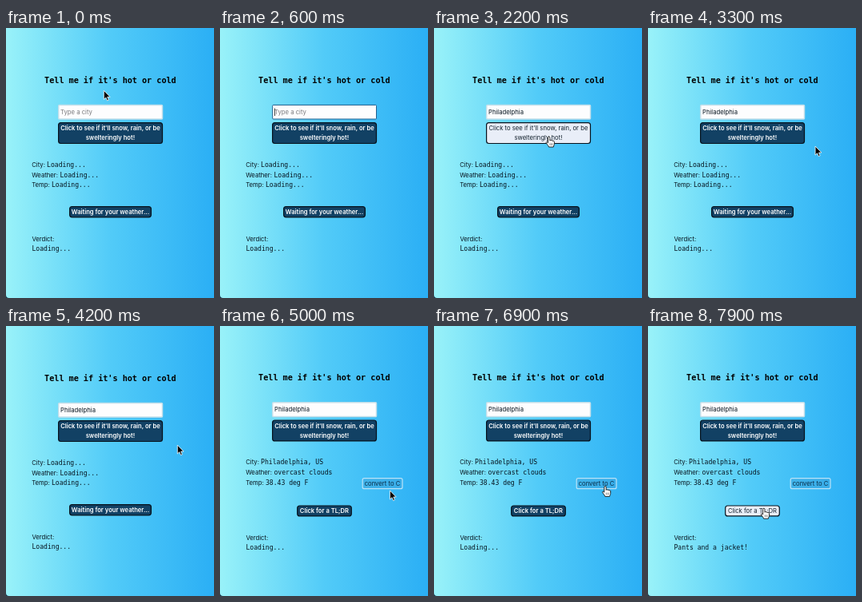
Write an HTML page that moves like this. It is 260x338 px and loops after 8000 ms.

```html
<!DOCTYPE html>
<html lang="en">
<head>
<meta charset="utf-8">
<title>Hot or cold</title>
<style>
  html, body { margin: 0; width: 100%; height: 100%; overflow: hidden; background: #12324a; }
  svg { display: block; width: 260px; height: 338px; }
  text { font: 7.7px Inter, sans-serif; fill: #06141f; white-space: pre; }
  .mono { font: 8.1px "DejaVu Sans Mono", monospace; }
  .title { font: bold 10.15px "DejaVu Sans Mono", monospace; fill: #000; }
  .center { text-anchor: middle; }
  .button rect { fill: #124164; stroke: #06121d; stroke-width: 1.2; }
  .button text { fill: #fff; font-size: 7.6px; font-weight: 600; text-anchor: middle; }
  .button.hover rect { fill: #e9eef8; }
  .button.hover text { fill: #14222e; font-size: 7.7px; font-weight: 400; }
  .field { fill: #fdfdfe; stroke: #c3dfea; stroke-width: 1.5; }
  .field.focus { stroke: #20608f; stroke-width: 1; }
  .placeholder { fill: #7b7b7e; }
</style>
</head>
<body>
<svg viewBox="0 0 260 338">
  <defs>
    <linearGradient id="sky">
      <stop offset="0" stop-color="#99f2f9"/>
      <stop offset=".5" stop-color="#52cbf8"/>
      <stop offset="1" stop-color="#2baff5"/>
    </linearGradient>
  </defs>
  <path fill="url(#sky)" d="M0 0H260V338H4Q0 338 0 334Z"/>

  <g id="form">
    <text class="title center" x="130.4" y="69">Tell me if it's hot or cold</text>

    <rect id="field" class="field" x="65.7" y="96.4" width="129.8" height="17.6" rx="1"/>
    <text id="typed" x="68" y="108"></text>
    <path id="caret" d="M0 100.5V110" stroke="#111" stroke-width=".8"/>

    <g id="submit" class="button">
      <rect x="65.6" y="118.6" width="129.9" height="25.9" rx="3"/>
      <text x="130.4" y="128.3">Click to see if it'll snow, rain, or be</text>
      <text x="130.4" y="140.3">swelteringly hot!</text>
    </g>

    <text x="32.2" y="174">City:</text><text id="city" class="mono" x="51.1" y="174"></text>
    <text x="32.2" y="186.7">Weather:</text><text id="weather" class="mono" x="67.4" y="186.7"></text>
  </g>
  <text x="32.2" y="199.4">Temp:</text><text id="temp" class="mono" x="56.9" y="199.4"></text>

  <g id="convert">
    <rect x="178.2" y="190.7" width="49.8" height="13" rx="2" fill="#3c9bd0" fill-opacity=".35" stroke="#b9e3f8" stroke-width="1.2"/>
    <text class="center" x="203" y="200" style="fill:#0b2f4a">convert to C</text>
  </g>

  <g id="waiting" class="button">
    <rect x="79.6" y="223.7" width="101.8" height="13.1" rx="3"/>
    <text x="130.5" y="233">Waiting for your weather...</text>
  </g>
  <g id="summary" class="button">
    <rect x="96.7" y="225" width="67.6" height="12.9" rx="3"/>
    <text x="130.4" y="234.3">Click for a TL;DR</text>
  </g>

  <g id="result">
    <text x="32.4" y="267">Verdict:</text>
    <text id="verdict" class="mono" x="32.4" y="279"></text>
  </g>

  <g id="cursor" stroke-linejoin="round">
    <path id="arrow" d="M0 0V11L2.5 8.7 4.2 12.6 6 11.8 4.4 8H7.8Z" fill="#000" stroke="#fff" stroke-width=".8"/>
    <g id="hand">
      <path d="M-1.2 1.3C-1.2 -.3 1.2 -.3 1.2 1.3V5C1.6 3.9 3.2 4.1 3.3 5.2 3.8 4.3 5 4.6 5.1 5.7 5.8 5 6.7 5.5 6.7 6.6V9.2C6.7 10.6 5.8 11.2 5.6 13H-.2C-.5 11.4 -2.4 9.8 -3.4 7.9 -3.8 6.7 -2.5 6.3 -1.2 7.8Z" fill="#fff" stroke="#111" stroke-width=".9"/>
      <path d="M1.2 8.2V11M2.8 8.2V11M4.4 8.2V11" stroke="#333" stroke-width=".5"/>
    </g>
  </g>
</svg>
<script>
const LOOP = 8000, STEP = 100;
const CITY = "Philadelphia", LOADING = "Loading...";
const TYPE_START = 650, TYPE_RATE = 100;
const RESULTS_AT = 4400, VERDICT_AT = 7800;

// Each move: start, end, destination of the pointer tip
const START = [122.3, 78.3];
const moves = [
  [100, 400, 117, 104],
  [1750, 2150, 143.7, 136],
  [2800, 3400, 214.3, 149],
  [4500, 4950, 212.4, 206],
  [5050, 5500, 214, 200.4],
  [6900, 7600, 144.8, 228.2]
];

const $ = id => document.getElementById(id);
const show = (id, on) => $(id).style.display = on ? "" : "none";
const write = (id, text) => $(id).textContent = text;
const place = (id, x, y) => $(id).setAttribute("transform", `translate(${x} ${y})`);
const ease = p => p * p * (3 - 2 * p);

function pointer(t) {
  let [x, y] = START;
  for (const [from, to, endX, endY] of moves) {
    const p = ease(Math.min(1, Math.max(0, (t - from) / (to - from))));
    x += (endX - x) * p;
    y += (endY - y) * p;
  }
  return [x, y];
}

function over(id, x, y) {
  const box = $(id).querySelector("rect").getBBox();
  return x >= box.x && x <= box.x + box.width && y >= box.y - 1 && y <= box.y + box.height;
}

function render(t) {
  const ready = t >= RESULTS_AT;
  const focused = t >= 500 && t < 2100;
  const count = t < TYPE_START ? 0 : Math.floor((t - TYPE_START) / TYPE_RATE) + 1;
  const typed = CITY.slice(0, count);

  write("typed", typed || "Type a city");
  $("typed").classList.toggle("placeholder", !typed);
  $("field").classList.toggle("focus", focused);
  show("caret", focused);
  place("caret", 68.5 + (typed ? $("typed").getComputedTextLength() : 0), 0);

  write("city", ready ? "Philadelphia, US" : LOADING);
  write("weather", ready ? "overcast clouds" : LOADING);
  write("temp", ready ? "38.43 deg F" : LOADING);
  write("verdict", t >= VERDICT_AT ? "Pants and a jacket!" : LOADING);
  show("convert", ready);
  show("summary", ready);
  show("waiting", !ready);

  // The convert button makes the centred column slightly taller
  place("form", 0, ready ? -.6 : 0);
  place("result", 0, ready ? .7 : 0);

  const [x, y] = pointer(t);
  const onSubmit = over("submit", x, y);
  const onSummary = ready && over("summary", x, y);
  const clickable = onSubmit || onSummary || (ready && over("convert", x, y));
  $("submit").classList.toggle("hover", onSubmit);
  $("summary").classList.toggle("hover", onSummary);
  show("cursor", t < 500 || t >= 1900);
  show("arrow", !clickable);
  show("hand", clickable);
  place("cursor", x, y);
}

const begin = performance.now();
function tick() {
  const t = (performance.now() - begin) % LOOP;
  render(Math.floor(t / STEP) * STEP);
  requestAnimationFrame(tick);
}
tick();
</script>
</body>
</html>
```
